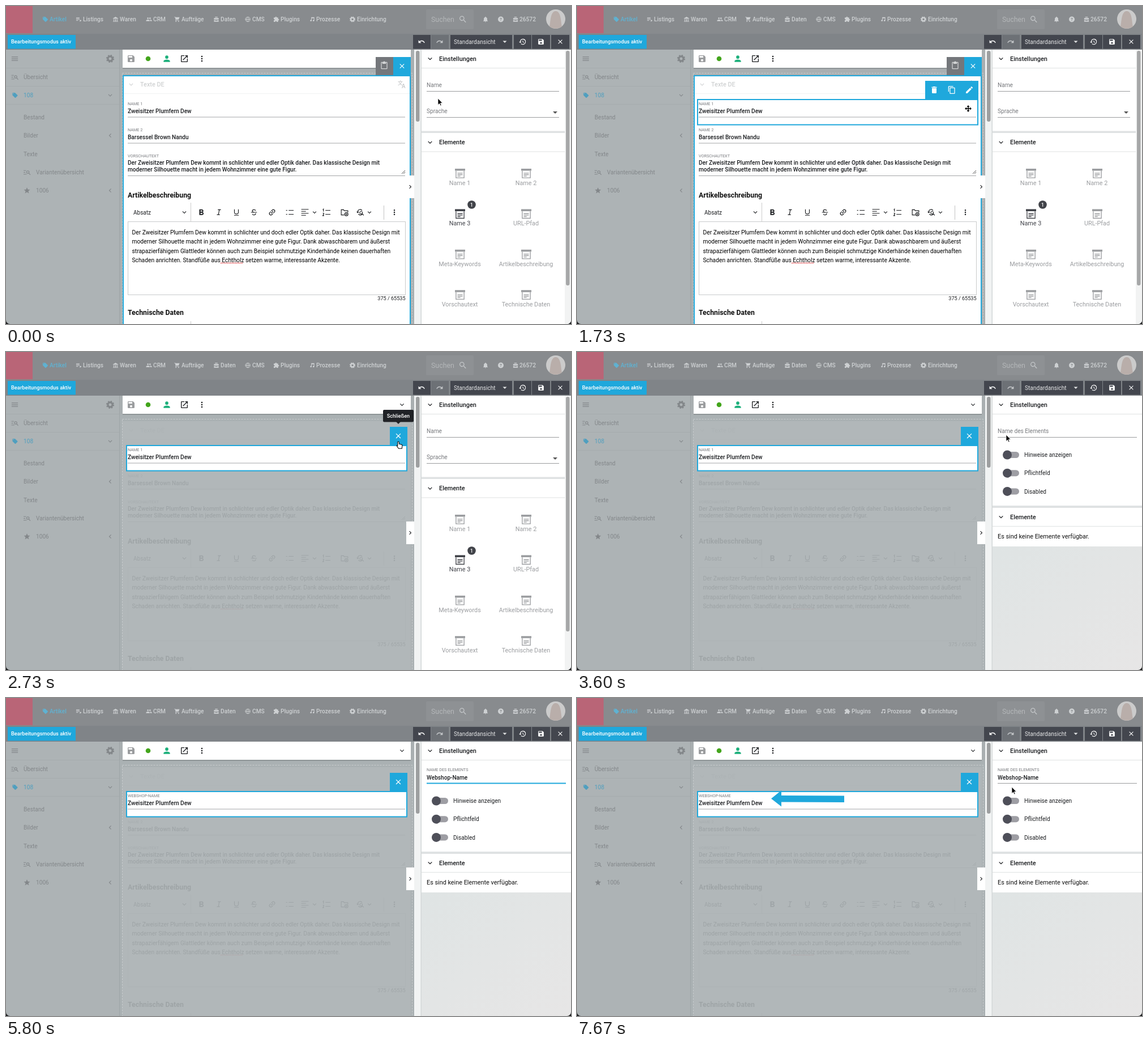
An HTML page that plays this animation: 998x561 px, repeating every 8 s.

```html
<!DOCTYPE html>
<html lang="de">
<head>
<meta charset="utf-8">
<title>Bearbeitungsmodus</title>
<style>
html, body { margin: 0; width: 100%; height: 100%; overflow: hidden; background: #17181a; }
svg { display: block; width: 100%; height: 100%; border-radius: 0 0 7px 7px; font-family: Roboto, "Noto Sans CJK SC", sans-serif; }
text { white-space: pre; }
</style>
</head>
<body>
<svg id="stage" viewBox="0 0 998 561"></svg>
<script>
const BLUE = '#1fa8dc', DARK = '#43464e', DIM = '#adb3b5', INK = '#1c1e21', GREY = '#77797d';
const LOOP = 8000;

// Icons on a 24 unit grid
const icons = {
  down: 'M16.6 8.6 12 13.2 7.4 8.6 6 10l6 6 6-6z',
  caret: 'M5 9l7 7 7-7z',
  close: 'M19 6.4 17.6 5 12 10.6 6.4 5 5 6.4 10.6 12 5 17.6 6.4 19 12 13.4 17.6 19 19 17.6 13.4 12z',
  menu: 'M3 18h18v-2H3zm0-5h18v-2H3zm0-7v2h18V6z',
  save: 'M17 3H5a2 2 0 0 0-2 2v14a2 2 0 0 0 2 2h14a2 2 0 0 0 2-2V7zM12 19a3 3 0 1 1 0-6 3 3 0 0 1 0 6zM15 9H5V5h10z',
  person: 'M12 12a4 4 0 1 0 0-8 4 4 0 0 0 0 8zm0 2c-2.7 0-8 1.3-8 4v2h16v-2c0-2.7-5.3-4-8-4z',
  open: 'M19 19H5V5h7V3H5a2 2 0 0 0-2 2v14a2 2 0 0 0 2 2h14a2 2 0 0 0 2-2v-7h-2zM14 3v2h3.6l-9.8 9.8 1.4 1.4L19 6.4V10h2V3z',
  more: 'M12 8a2 2 0 1 0 0-4 2 2 0 0 0 0 4zm0 2a2 2 0 1 0 0 4 2 2 0 0 0 0-4zm0 6a2 2 0 1 0 0 4 2 2 0 0 0 0-4z',
  bell: 'M12 22a2 2 0 0 0 2-2h-4a2 2 0 0 0 2 2zm6-6v-5c0-3.1-1.6-5.6-4.5-6.3V4a1.5 1.5 0 0 0-3 0v.7C7.6 5.4 6 7.9 6 11v5l-2 2v1h16v-1z',
  search: 'M15.5 14h-.8l-.3-.3A6.5 6.5 0 1 0 13.7 14.4l.3.3v.8l5 5 1.5-1.5zM9.5 14a4.5 4.5 0 1 1 0-9 4.5 4.5 0 0 1 0 9z',
  trash: 'M6 19a2 2 0 0 0 2 2h8a2 2 0 0 0 2-2V7H6zM19 4h-3.5l-1-1h-5l-1 1H5v2h14z',
  copy: 'M16 1H4a2 2 0 0 0-2 2v14h2V3h12zm3 4H8a2 2 0 0 0-2 2v14a2 2 0 0 0 2 2h11a2 2 0 0 0 2-2V7a2 2 0 0 0-2-2zm0 16H8V7h11z',
  pencil: 'M3 17.3V21h3.8l11-11.1-3.7-3.7zM20.7 7a1 1 0 0 0 0-1.4l-2.3-2.3a1 1 0 0 0-1.4 0l-1.8 1.8 3.7 3.7z',
  undo: 'M12.5 8c-2.6 0-5 1-6.9 2.6L2 7v9h9l-3.6-3.6c1.4-1.2 3.1-1.9 5.1-1.9 3.5 0 6.5 2.3 7.6 5.5l2.4-.8C21 11 17.2 8 12.5 8z',
  redo: 'M11.5 8c2.6 0 5 1 6.9 2.6L22 7v9h-9l3.6-3.6c-1.4-1.2-3.1-1.9-5.1-1.9-3.5 0-6.5 2.3-7.6 5.5l-2.4-.8C3 11 6.8 8 11.5 8z',
  history: 'M13 3a9 9 0 0 0-9 9H1l4 4 4-4H6a7 7 0 1 1 2 5l-1.4 1.4A9 9 0 1 0 13 3zm-1 5v5l4.3 2.5.7-1.2-3.5-2.1V8z',
  star: 'M12 17.3 18.2 21l-1.6-7L22 9.2l-7.2-.6L12 2 9.2 8.6 2 9.2 7.5 14l-1.7 7z',
  tag: 'M21.4 11.6l-9-9A2 2 0 0 0 11 2H4a2 2 0 0 0-2 2v7c0 .5.2 1 .6 1.4l9 9a2 2 0 0 0 2.8 0l7-7a2 2 0 0 0 0-2.8zM5.5 4a1.5 1.5 0 1 1 0 3 1.5 1.5 0 0 1 0-3z',
  board: 'M19 2h-4.2a3 3 0 0 0-5.6 0H5a2 2 0 0 0-2 2v16a2 2 0 0 0 2 2h14a2 2 0 0 0 2-2V4a2 2 0 0 0-2-2zM19 20H5V4h2v3h10V4h2z',
  list: 'M2 5h13v2.5H2zm0 5h13v2.5H2zm0 5h8v2.5H2zM16 13l7 4-7 4z',
  bank: 'M2 8 12 2l10 6v2H2zM4 12h3v7H4zM10 12h4v7h-4zM17 12h3v7h-3zM2 20h20v2H2z',
  people: 'M8 11a3 3 0 1 0 0-6 3 3 0 0 0 0 6zm8 0a3 3 0 1 0 0-6 3 3 0 0 0 0 6zM8 13c-2.3 0-7 1.2-7 3.5V19h14v-2.5C15 14.2 10.3 13 8 13zm8 0c2.3 0 7 1.2 7 3.5V19h-6v-2.5c0-1.5-.6-2.6-1.6-3.4z',
  cart: 'M1 2h3.3l1 2H21l-4 9H8l-1 2h12v2H4l2-4L3 4H1zM7 18a2 2 0 1 0 0 4 2 2 0 0 0 0-4zm10 0a2 2 0 1 0 0 4 2 2 0 0 0 0-4z',
  box: 'M7 2h10v3H7zM3 7h18v6H3zM3 15h5v2h8v-2h5v6H3z',
  puzzle: 'M20 11h-1V7a2 2 0 0 0-2-2h-4V4a2.5 2.5 0 0 0-5 0v1H4a2 2 0 0 0-2 2v4h1.5a2.6 2.6 0 0 1 0 5H2v4c0 1 1 2 2 2h4v-1.5a2.6 2.6 0 0 1 5 0V22h4a2 2 0 0 0 2-2v-4h1a2.5 2.5 0 0 0 0-5z',
  note: 'M9 4h12v13a3 3 0 1 1-2-3V8h-8v9a3 3 0 1 1-2-3z',
  bold: 'M15.6 10.8c1-.7 1.6-1.8 1.6-2.8 0-2.3-1.7-4-4-4H7v14h7c2.1 0 3.7-1.7 3.7-3.8 0-1.5-.9-2.8-2.1-3.4zM10 6.5h3a1.5 1.5 0 0 1 0 3h-3zM13.5 15.5H10v-3h3.5a1.5 1.5 0 0 1 0 3z',
  link: 'M3.9 12A3.1 3.1 0 0 1 7 8.9h4V7H7a5 5 0 0 0 0 10h4v-1.9H7A3.1 3.1 0 0 1 3.9 12zM8 13h8v-2H8zm9-6h-4v1.9h4a3.1 3.1 0 0 1 0 6.2h-4V17h4a5 5 0 0 0 0-10z'
};
const lines = {
  globe: 'M12 3a9 9 0 1 0 0 18 9 9 0 0 0 0-18M3 12h18M12 3c-5 5-5 13 0 18 5-5 5-13 0-18',
  overview: 'M1 6h8M1 12h6M1 18h10M15 7a4 4 0 1 0 0 8 4 4 0 0 0 0-8M18 14l5 6',
  italic: 'M9 4h9M6 19h9M13.5 4l-3 15',
  under: 'M6 3v8a6 6 0 0 0 12 0V3M5 21h14',
  strike: 'M17 7c-1-4-10-4-10 .5 0 2.5 2 3.5 5 4.5M3 12h18M7 17c1 4 11 4 10-2',
  bullets: 'M1 6h4M1 18h4M9 6h15M9 18h15',
  numbers: 'M1 4l2-2v8M1 15q4-2 3 2l-3 5h4M9 6h15M9 18h15',
  align: 'M1 3h22M1 9h14M1 15h22M1 21h14',
  folder: 'M11 20H2V4h7l2 3h11v5M17.5 12.5a5 5 0 1 0 0 10 5 5 0 0 0 0-10M17.5 15v5M15 17.5h5',
  replace: 'M17 7a7 7 0 0 0-13 2v4M1 10l3 3 3-3M6 17a7 7 0 0 0 12 0M14 9a4 4 0 1 0 .1 0M17 16l5 5',
  form: 'M2.5 5v16.5h19V5M6 10.5h12M6 14h12M6 17.5h7'
};

const rect = (x, y, w, h, fill, extra = '') => `<rect x="${x}" y="${y}" width="${w}" height="${h}" fill="${fill}" ${extra}/>`;
const circle = (x, y, r, fill, extra = '') => `<circle cx="${x}" cy="${y}" r="${r}" fill="${fill}" ${extra}/>`;
const text = (x, mid, str, size = 10.15, fill = INK, weight = 400, extra = '') =>
  `<text x="${x}" y="${mid + size * .36}" font-size="${size}" fill="${fill}" font-weight="${weight}" ${extra}>${str}</text>`;
const place = (x, y, size, turn = 0) => `transform="translate(${x} ${y}) rotate(${turn}) scale(${size / 24}) translate(-12 -12)"`;
const icon = (name, x, y, size, fill, turn) => `<path d="${icons[name]}" fill="${fill}" fill-rule="evenodd" ${place(x, y, size, turn)}/>`;
const line = (name, x, y, size, stroke, width = 2) =>
  `<path d="${lines[name]}" fill="none" stroke="${stroke}" stroke-width="${width}" ${place(x, y, size)}/>`;
const group = (id, body, extra = '') => `<g id="${id}" ${extra}>${body}</g>`;
const gear = (x, y, r, fill) =>
  circle(x, y, r * .58, 'none', `stroke="${fill}" stroke-width="${r * .45}"`) +
  circle(x, y, r * .87, 'none', `stroke="${fill}" stroke-width="${r * .28}" stroke-dasharray="${r * .36} ${r * .323}"`);
const formIcon = (x, y, color) => line('form', x, y, 18, color, 1.8) + rect(x - 9, y - 9, 18, 3.6, color);

function header() {
  const ink = '#cdd0d2', mid = 23.5;
  const nav = [['Artikel', 77, 'tag'], ['Listings', 136, 'list'], ['Waren', 201, 'bank'], ['CRM', 260, 'people'], ['Aufträge', 310, 'cart'],
    ['Daten', 379, 'box'], ['CMS', 435, 'globe'], ['Plugins', 485, 'puzzle'], ['Prozesse', 548, 'note'], ['Einrichtung', 620, 'gear']];
  let s = rect(0, 0, 998, 49, '#888b8e') + rect(0, 49, 998, 28, '#808488') + rect(0, 0, 47, 48, '#b96577');
  nav.forEach(([label, x, name], i) => {
    const color = i ? ink : '#5fb2d2';
    s += text(x, mid, label, 10.2, color, 500);
    s += name === 'gear' ? gear(x - 8, mid, 5, color) : lines[name] ? line(name, x - 8, mid, 11, color) : icon(name, x - 7.5, mid, 11, color);
  });
  s += rect(742, 6, 84, 35, '#8e9194', 'rx="2"') + text(751, mid, 'Suchen', 12.4, '#b4b7b9') + icon('search', 807, mid, 16, '#c3c6c8');
  s += icon('bell', 847, mid, 12, ink) + circle(874, mid, 5, ink) + text(874, mid, '?', 8, '#85888b', 700, 'text-anchor="middle"');
  s += icon('box', 900, mid, 11, ink) + text(907, mid, '26572', 10.2, ink, 500);
  s += circle(971, 23, 17, '#cbcbcb') + '<path d="M960 36c2-6 1-27 11-27s9 21 11 27c-6 5-16 5-22 0z" fill="#b9aeaa"/>';
  s += rect(3, 51, 120, 24.5, BLUE) + text(9, 63, 'Bearbeitungsmodus aktiv', 9.3, '#fff', 500);
  [[719, 31], [751, 31, '#6d7176'], [785, 109], [897, 31], [929, 32], [963, 32]].forEach(([x, w, fill = DARK]) => s += rect(x, 51, w, 24.5, fill));
  s += icon('undo', 734, 63, 13, '#fff') + icon('redo', 766, 63, 13, '#c3c6c8') + text(791, 63, 'Standardansicht', 10.15, '#e4e5e6');
  return s + icon('caret', 881, 63, 12, '#e4e5e6') + icon('history', 912.5, 63, 14, '#fff') + icon('save', 945, 63, 13, '#fff') + icon('close', 979, 63, 13, '#fff');
}

function sidebar() {
  const ink = '#83878a', blue = '#4f9fbf';
  let s = rect(0, 77, 206, 484, DIM) + rect(200, 77, 1, 484, '#9fa5a7');
  [109, 141, 173].forEach(y => s += rect(0, y, 200, 1, '#a5abad'));
  s += icon('menu', 15.5, 93, 15, ink) + gear(184, 93, 7, ink);
  s += line('overview', 15.5, 125.5, 13, ink) + text(31, 125.5, 'Übersicht', 10.15, ink);
  s += icon('tag', 16, 157.5, 11, blue) + text(31, 157.5, '108', 10.15, blue) + icon('down', 184, 157.5, 14, ink);
  s += text(31, 196.5, 'Bestand', 10.15, ink) + text(31, 228.5, 'Bilder', 10.15, ink) + text(31, 261, 'Texte', 10.15, ink);
  s += line('overview', 37, 293.5, 13, ink) + text(53, 293.5, 'Variantenübersicht', 10.15, ink);
  s += icon('star', 37, 325.5, 13, ink) + text(53, 325.5, '1006', 10.15, ink);
  return s + icon('down', 184, 228.5, 14, ink, 90) + icon('down', 184, 325.5, 14, ink, 90);
}

function editor() {
  const bold = (y, str) => text(215, y, str, 10.1, INK, 500), label = (y, str) => text(215, y, str, 7.25, GREY);
  const rule = (y) => rect(215, y, 490, 1, '#a3a5a7');
  let s = rect(206, 122, 509, 439, '#fff');
  s += icon('down', 221, 138.5, 14, '#cfd1d2') + text(237, 138.5, 'Texte DE', 10.8, '#cfd1d2', 500) + rect(208, 154, 505, 1, '#f1f2f2');
  s += text(692, 136, '文', 9, '#b9bcbe') + text(699, 141, 'A', 10, '#b9bcbe');
  s += label(218, 'NAME 2') + bold(231.5, 'Barsessel Brown Nandu') + rule(241.5);
  s += label(264.5, 'VORSCHAUTEXT') + bold(276.5, 'Der Zweisitzer Plumfern Dew kommt in schlichter und edler Optik daher. Das klassische Design mit');
  s += bold(288.5, 'moderner Silhouette macht in jedem Wohnzimmer eine gute Figur.') + rule(299);
  s += '<path d="M699 296l6-6M702 296l3-3" stroke="#555"/>';
  s += text(215, 334, 'Artikelbeschreibung', 12.3, '#111', 700) + text(215, 541, 'Technische Daten', 12.3, '#111', 700);
  s += text(225, 364, 'Absatz', 10) + icon('down', 315, 364, 14, INK) + rect(326, 347, 1, 33, '#ccc') + rect(667, 352, 1, 25, '#c4c4c4') + rect(326, 556, 1, 5, '#ccc');
  s += icon('bold', 345, 364.5, 17, INK) + icon('link', 470, 364, 15, INK, -45) + icon('more', 686, 364, 15, INK);
  [['italic', 376], ['under', 407], ['strike', 438], ['bullets', 501], ['align', 528], ['numbers', 566], ['folder', 598], ['replace', 626]]
    .forEach(([name, x]) => s += line(name, x, 364, 14, INK));
  s += icon('down', 545, 364, 13, INK) + icon('down', 642, 364, 13, INK);
  s += rect(215.5, 380.5, 490, 129, '#fff', 'stroke="#c9cbcc"');
  ['Der Zweisitzer Plumfern Dew kommt in schlichter und doch edler Optik daher. Das klassische Design mit',
    'moderner Silhouette macht in jedem Wohnzimmer eine gute Figur. Dank abwaschbarem und äußerst',
    'strapazierfähigem Glattleder können auch zum Beispiel schmutzige Kinderhände keinen dauerhaften',
    'Schaden anrichten. Standfüße aus Echtholz setzen warme, interessante Akzente.']
    .forEach((str, i) => s += text(222.5, 399.5 + i * 16.2, str, 10.25, '#000'));
  s += '<path d="M379 453.5h39" stroke="#e0393e" stroke-width="1.5" stroke-dasharray="1.5 1"/>';
  return s + text(705.5, 516, '375 / 65535', 9.1, INK, 400, 'text-anchor="end"');
}

function toolbar() {
  let s = rect(206, 108, 509, 3, '#8f9597') + rect(206, 77, 509, 32, '#fff');
  s += icon('save', 221, 93, 16, '#9b9d9f') + circle(251, 93, 4.3, '#43a51c') + icon('person', 284, 93, 17, '#1eb07c');
  s += icon('open', 315, 93, 16, INK) + icon('more', 346, 93, 16, INK);
  s += group('groupTools', rect(653, 90, 31, 32, '#74777b') + rect(684, 90, 31, 32, BLUE) + icon('board', 668, 105, 15, '#d3d5d6') + icon('close', 699.5, 106, 14, '#fff'));
  return s + group('collapse', icon('down', 699.5, 93, 14, INK));
}

function section(y, label) {
  return icon('down', 749, y, 15, INK) + text(765, y, label, 10.9, INK, 500) + rect(734, y + 16, 264, 1, '#dfe2e2');
}

function formPanel() {
  let s = rect(733, 77, 265, 484, '#fff') + section(93, 'Einstellungen') + section(240.5, 'Elemente') + rect(733, 220.5, 265, 3.5, '#dfe2e3');
  s += text(743, 139, 'Name', 10.15, GREY) + rect(743, 150, 234, 1, '#9a9c9e');
  s += text(743, 185.5, 'Sprache', 10.15, GREY) + rect(743, 196, 234, 1, '#9a9c9e') + '<path d="M966 186h8l-4 4z" fill="#555"/>';
  ['Name 1', 'Name 2', 'Name 3', 'URL-Pfad', 'Meta-Keywords', 'Artikelbeschreibung', 'Vorschautext', 'Technische Daten'].forEach((label, i) => {
    const x = 801.5 + i % 2 * 117, y = 296 + (i >> 1) * 71.4, color = i === 2 ? '#414349' : '#9b9da0';
    s += formIcon(x + .5, y, color) + text(x, y + 16, label, 10.8, color, 400, 'text-anchor="middle"');
  });
  s += circle(822.5, 350.5, 7.3, '#414349') + text(822.5, 350.5, '1', 8.5, '#fff', 500, 'text-anchor="middle"');
  return s + rect(987, 77, 11, 484, '#f2f3f3') + rect(989, 79, 6.5, 414, '#a6a7a8', 'rx="3.2"');
}

function elementPanel() {
  let s = rect(733, 77, 265, 266, '#fff') + rect(733, 343, 265, 218, 'url(#shade)');
  s += section(93, 'Einstellungen') + section(291, 'Elemente') + rect(733, 271, 265, 4, '#dfe2e3');
  s += text(743, 139, '', 10.15, GREY, 400, 'id="label"') + text(743, 140, '', 10.1, INK, 500, 'id="value"');
  s += rect(743, 150, 246, 1, '#9a9c9e') + rect(743, 149.5, 246, 2, BLUE, 'id="focusLine"') + rect(0, 134, 1, 12, '#111', 'id="caret"');
  ['Hinweise anzeigen', 'Pflichtfeld', 'Disabled'].forEach((str, i) => {
    const y = 181.5 + i * 32.2;
    s += rect(755, y - 5.5, 26, 11, '#9e9ea4', 'rx="5.5"') + circle(760, y, 8, '#4e4f59') + text(790, y, str, 10.1);
  });
  return s + text(743, 325, 'Es sind keine Elemente verfügbar.', 10.85, '#111');
}

const outline = 'stroke="#fff" stroke-width="1"';
stage.innerHTML = '<defs><linearGradient id="shade" x2="1" y2="1"><stop stop-color="#dfe4e4"/><stop offset="1" stop-color="#e7e6e6"/></linearGradient></defs>' +
  header() + sidebar() + rect(201, 77, 521, 484, '#a9afb1') + editor() + rect(201, 110, 520, 451, '#abb1b3', 'id="veil"') +
  rect(205.5, 118.5, 512, 460, 'none', 'stroke="#c9cdce" stroke-dasharray="3 2"') +
  rect(207, 123, 507, 450, 'none', `id="editorFrame" stroke="${BLUE}" stroke-width="2"`) + toolbar() +
  rect(213, 165, 495, 44.5, '#fff', `id="fieldFrame" stroke="${BLUE}" stroke-width="2"`) +
  text(215, 172, '', 7.25, GREY, 400, 'id="fieldLabel"') + text(215, 185, 'Zweisitzer Plumfern Dew', 10.1, INK, 500) + rect(215, 195.5, 490, 1, '#a3a5a7') +
  group('fieldTools', rect(615, 132, 94, 33, BLUE) + icon('trash', 631, 148, 16, '#fff') + icon('copy', 662, 148, 15, '#fff') + icon('pencil', 693, 148, 16, '#fff')) +
  group('fieldClose', rect(678, 132, 31, 33, BLUE) + icon('close', 693, 148, 15, '#fff')) +
  rect(721, 77, 12, 484, '#f1f3f3') + rect(724, 79, 6.5, 125, '#9d9fa0', 'rx="3.2"') +
  group('before', formPanel()) + group('after', elementPanel()) + rect(732.5, 77, 1.5, 484, '#d3d7d8') +
  rect(707, 299, 14, 40, '#fff') + icon('down', 714, 319, 13, INK, -90) +
  group('tip', rect(0, 102, 0, 21.5, '#202226', 'id="tipBox" rx="2"') + '<path d="M689 123h8l-4 4z" fill="#202226"/>' +
    text(693, 112.5, '', 9.1, '#fff', 500, 'id="tipText" text-anchor="middle"')) +
  `<path id="pointer" d="M343 177.5l18-14.5v9l111 .5v11.5l-111-.5v8z" fill="${BLUE}"/>` +
  group('cursor',
    `<path id="arrow" d="M0 0v16l3.7-3.5 2.4 5.6 2.4-1-2.4-5.5H11z" fill="#000" ${outline} transform="scale(.72)"/>` +
    `<path id="move" d="M0-6l2.5 3H.8v2.2H3v-1.7L6 0 3 2.5V.8H.8V3h1.7L0 6l-2.5-3h1.7V.8H-3v1.7L-6 0l3-2.5v1.7h2.2V-3h-1.7z" fill="#000"/>` +
    '<path id="hand" d="M4 0c1 0 1.5.6 1.5 1.5V5l5 1c1 .3 1.5 1 1.4 2l-.7 6H4.5L1 9c-.6-.8 0-1.6 1-1.4l.6.6V1.5C2.5.6 3 0 4 0z" fill="#fff" stroke="#000" stroke-width="1.2" transform="scale(.88) translate(-4 0)"/>' +
    '<path id="beam" d="M-2.5-6.5h2q.5 0 .5 1v11q0 1-.5 1h-2M2.5-6.5h-2q-.5 0-.5 1M2.5 6.5h-2q-.5 0-.5-1" fill="none" stroke="#111"/>');

const el = id => document.getElementById(id);
const ramp = (t, from, to) => Math.min(1, Math.max(0, (t - from) / (to - from)));
const smooth = p => p * p * (3 - 2 * p);
const show = (id, opacity) => el(id).setAttribute('opacity', +opacity);
const set = (id, attrs) => { for (const k in attrs) el(id).setAttribute(k, attrs[k]); };

const path = [[670, 763, 163], [1270, 691, 181], [1730, 691, 181], [2270, 693, 158], [3200, 693, 158], [3350, 714, 166],
  [3600, 758, 146], [3730, 763, 140.5], [6200, 763, 140.5], [6470, 768, 157]];
function cursorAt(t) {
  const i = path.findIndex(p => p[0] > t);
  if (i === 0) return path[0].slice(1);
  if (i < 0) return path[path.length - 1].slice(1);
  const [t0, x0, y0] = path[i - 1], [t1, x1, y1] = path[i], p = smooth(ramp(t, t0, t1));
  return [x0 + (x1 - x0) * p, y0 + (y1 - y0) * p];
}
const word = 'Webshop-Name';
const keys = [4530, 4600, 4670, 4800, 4840, 4870, 4930, 5130, 5270, 5330, 5470, 5530];

function draw(t) {
  const [x, y] = cursorAt(t);
  const hover = x < 709 && t < 2600, editing = t >= 2600, dim = ramp(t, 2600, 2730);

  show('veil', dim * .92);
  show('editorFrame', 1 - dim);
  show('groupTools', 1 - dim);
  show('collapse', dim);
  show('fieldFrame', hover || editing);
  show('fieldTools', hover);
  show('fieldClose', editing);
  show('before', t < 2870);
  show('after', t >= 2870);

  const tipWidth = editing ? 54 : 59;
  set('tipBox', { x: 693 - tipWidth / 2, width: tipWidth });
  el('tipText').textContent = editing ? 'Schließen' : 'Bearbeiten';
  show('tip', ramp(t, 2050, 2250) * (1 - ramp(t, 3270, 3400)));

  const typed = word.slice(0, keys.filter(k => k <= t).length);
  const focused = t >= 4130 && t < 6700, float = smooth(ramp(t, 4130, 4400)), size = 10.15 - 2.9 * float;
  el('value').textContent = typed;
  el('fieldLabel').textContent = (typed || 'Name 1').toUpperCase();
  el('label').textContent = t < 4130 ? 'Name des Elements' : 'NAME DES ELEMENTS';
  set('label', { y: 139 - 12.5 * float + size * .36, 'font-size': size });
  set('focusLine', { x: 866 - 123 * float, width: 246 * float });
  show('focusLine', focused);
  set('caret', { x: 743 + (typed ? el('value').getComputedTextLength() : 0) });
  show('caret', focused && (t < 5800 || t >= 6300));

  const shape = t >= 4500 && t < 6200 ? '' : t >= 3700 && t < 6270 ? 'beam' : x >= 709 ? 'arrow' : y > 165 ? 'move' : 'hand';
  ['arrow', 'move', 'hand', 'beam'].forEach(id => show(id, id === shape));
  set('cursor', { transform: `translate(${x} ${y})` });

  show('pointer', ramp(t, 7150, 7670));
}

const start = performance.now();
function tick() {
  draw((performance.now() - start) % LOOP);
  requestAnimationFrame(tick);
}
tick();
</script>
</body>
</html>
```
